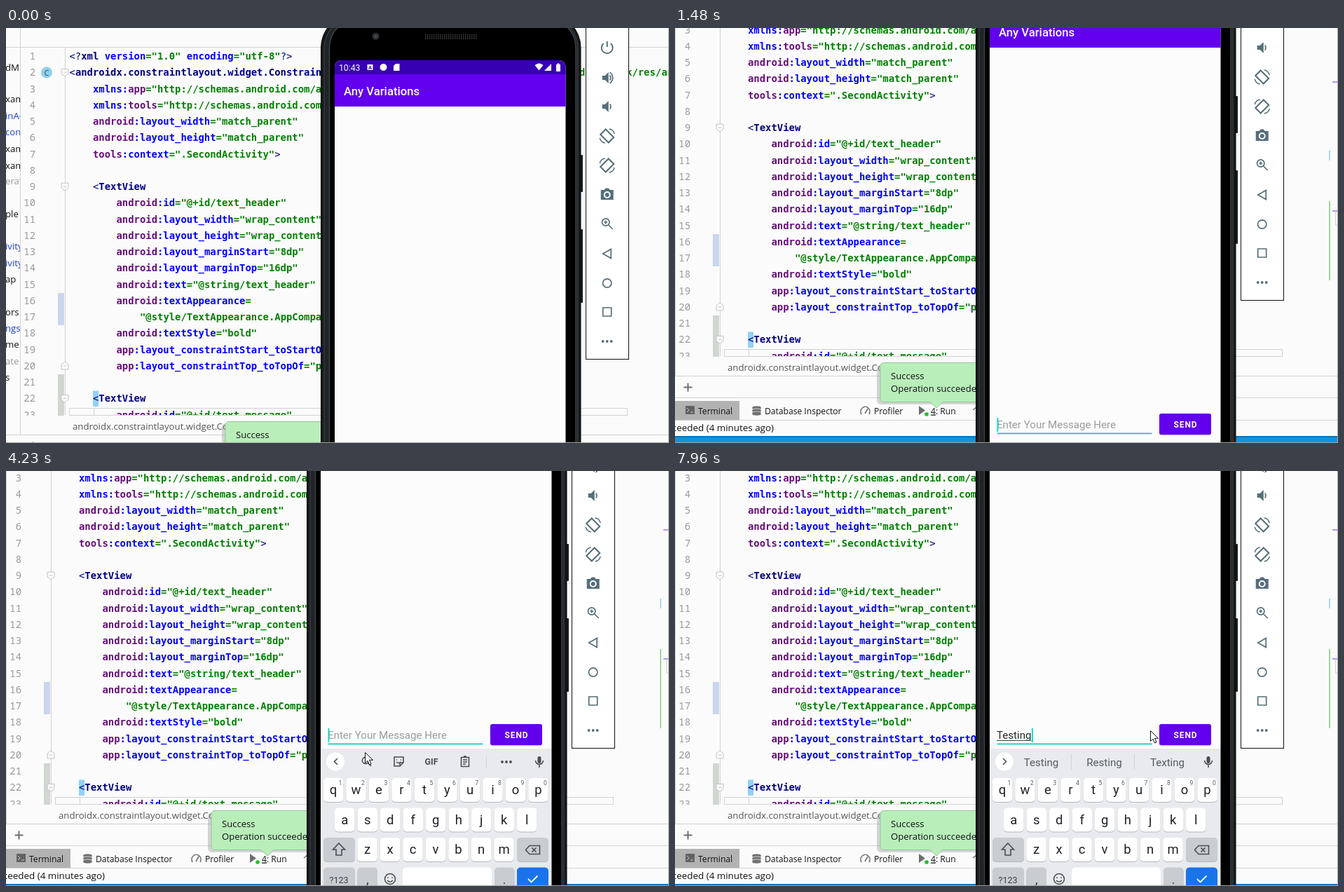
These frames come from a looping animation (946x592 px, 8 s). An HTML page:

```html
<!DOCTYPE html>
<html lang="en">
<head>
<meta charset="utf-8">
<style>
html, body { margin: 0; width: 100%; height: 100%; overflow: hidden; background: #fbfbfb; }
svg { display: block; width: 946px; height: 592px; font-family: "Open Sans", sans-serif; }
.code { font: bold 13.9px "DejaVu Sans Mono", monospace; }
.num { font: 13.95px "Noto Sans Mono", monospace; fill: #999; text-anchor: end; }
.val { fill: #008000; }
.mark { fill: #000080; font-weight: 400; }
.tag { fill: #000080; }
.ns { fill: #660e7a; }
.attr { fill: #00f; }
.ui { font-family: Roboto, sans-serif; }
.mid { text-anchor: middle; }
.line { fill: none; stroke: #d2d2d2; }
.icon { fill: none; stroke: #546e7a; stroke-width: 1.7; }
.full { fill: #546e7a; stroke: none; }
.kicon { fill: none; stroke: #4a4e53; stroke-width: 1.6; }
.kfull { fill: #4a4e53; stroke: none; }
</style>
</head>
<body>
<svg id="stage" viewBox="0 0 946 592"></svg>
<script>
const LOOP = 8000;
const rect = (x, y, w, h, fill, extra = '') =>
  `<rect x="${x}" y="${y}" width="${w}" height="${h}" fill="${fill}" ${extra}/>`;
const text = (x, y, size, fill, str, extra = '') =>
  `<text x="${x}" y="${y}" font-size="${size}" fill="${fill}" ${extra}>${str}</text>`;
const path = (d, cls, extra = '') => `<path d="${d}" class="${cls}" ${extra}/>`;
const circle = (x, y, r, extra) => `<circle cx="${x}" cy="${y}" r="${r}" ${extra}/>`;
const group = (x, y, body, extra = '') => `<g transform="translate(${x} ${y})" ${extra}>${body}</g>`;
const dots = (x, y, cls) => [-6, 0, 6].map(d => circle(x + d, y, 1.9, `class="${cls}"`)).join('');

// ---- code editor ----
const CHAR = 8.37, PITCH = 23.26, CODE_X = 70.5;
const lineY = n => -32 + (n - 1) * PITCH;
const source = `<?xml version="1.0" encoding="utf-8"?>
<androidx.constraintlayout.widget.ConstraintLayout xmlns:android="http://schemas.android.com/apk/res/android"
    xmlns:app="http://schemas.android.com/apk/res-auto"
    xmlns:tools="http://schemas.android.com/tools"
    android:layout_width="match_parent"
    android:layout_height="match_parent"
    tools:context=".SecondActivity">

    <TextView
        android:id="@+id/text_header"
        android:layout_width="wrap_content"
        android:layout_height="wrap_content"
        android:layout_marginStart="8dp"
        android:layout_marginTop="16dp"
        android:text="@string/text_header"
        android:textAppearance=
            "@style/TextAppearance.AppCompat"
        android:textStyle="bold"
        app:layout_constraintStart_toStartOf="parent"
        app:layout_constraintTop_toTopOf="parent" />

    <TextView
        android:id="@+id/text_message"`.split('\n');

const token = /(?<val>="[^"]*"|"[^"]*"|=)|(?<mark>[<?>\/]+)|(?<tag>(?<=[<?])[\w.]+)|(?<ns>(?:android|tools|app)(?=:)|(?<=xmlns:)\w+)|(?<attr>xmlns:|:?\w+)/g;
const highlight = line => line.trim().replace(token, (...args) => {
  const [kind, str] = Object.entries(args.at(-1)).find(([, v]) => v);
  return `<tspan class="${kind}">${str.replace(/</g, '&lt;').replace(/>/g, '&gt;')}</tspan>`;
});

function foldMark(n, up) {
  const y = lineY(n) - 5;
  const d = up ? 'M-5 5V-2L0-6 5-2V5Z' : 'M-5-5V2L0 6 5 2V-5Z';
  return group(64, y, path(d + 'M-2.5 0h5', 'line', 'style="fill:#fbfbfb;stroke:#c4c4c4"'));
}

function editor() {
  const project = [
    ['dM', 56], ['xamp', 101], ['inAc', 125, 1], ['cond', 148, 1], ['xamp', 172], ['xamp', 196],
    ['erate', 218, 2], ['ple', 265], ['ivity', 311, 1], ['ivity', 335, 1], ['ap', 358],
    ['ors.', 405], ['ngs', 428, 1], ['me', 451], ['ate', 475, 2], ['s', 498]];
  const inks = ['#111', '#1a3fc4', '#999'];
  return rect(-30, -100, 1100, 800, '#fbfbfb')
    + project.map(([s, y, ink = 0]) => text(-21, y - 72.5, 13.2, inks[ink], s)).join('')
    + rect(0, -100, 1000, 604, '#fbfbfb')
    + path('M-30-49.5H1000M.5-100V503', 'line')
    + rect(54, 301, 9, 46, '#c9d6ee') + rect(54, 417, 9, 59, '#d0d6d0')
    + path('M64.5-49V475', 'line')
    + rect(104, 440.5, 8, 22.5, '#90d2f8')
    + path('M105.5 466v10', 'line')
    + source.map((line, i) => {
        const x = CODE_X + line.search(/\S|$/) * CHAR, y = lineY(i + 1);
        return `<text class="num" x="22" y="${y}">${i + 1}</text><text class="code" x="${x}" y="${y}">${highlight(line)}</text>`;
      }).join('')
    + foldMark(2) + foldMark(9) + foldMark(20, true) + foldMark(22)
    + circle(38, -13.5, 8, 'fill="#8fd0ee"') + text(38, -9.5, 11, '#2c4a5a', 'C', 'class="mid"')
    + rect(70.5, 465.5, 796, 10, 'none', 'class="line"')
    + rect(1, 476, 1000, 113, '#fbfbfb')
    + rect(933, 182, 2, 14, '#a5daf2') + rect(933, 254, 2, 113, '#9cd99c')
    + rect(938, 83, 10, 2, '#b39be6') + rect(938, 267, 10, 2, '#b39be6')
    + path('M950 269H942.5V288H950', 'line');
}

// ---- bars below the editor ----
function bottomBars() {
  const grey = 'fill="none" stroke="#6e6e6e" stroke-width="1.6"';
  return text(75, 496, 13.2, '#555', 'androidx.constraintlayout.widget.ConstraintLayout')
    + path('M-30 503.5H1000M-30 534.5H1000M-30 566.5H1000', 'line')
    + '<path d="M12.5 519.5h12M18.5 513.5v12" stroke="#6e6e6e" stroke-width="2"/>'
    + rect(-1, 539, 93, 27, '#b2b2b2')
    + rect(15, 546, 13, 12, '#626262') + '<path d="M17 549l3 3-3 3M22 555h4" fill="none" stroke="#c8c8c8"/>'
    + text(33, 557.5, 12.1, '#111', 'Terminal')
    + [0, 4, 8].map(d => `<path d="M110 ${548 + d}a6.5 2 0 0 1 13 0v2a6.5 2 0 0 1-13 0z" fill="#707070" stroke="#fbfbfb" stroke-width=".7"/>`).join('')
    + text(128, 557.5, 12.1, '#111', 'Database Inspector')
    + `<path d="M266 558a6.5 7 0 1 1 11 0M271 557l4-7" ${grey}/>`
    + text(284, 557.5, 12.1, '#111', 'Profiler')
    + '<path d="M348 546l9 6.5-9 6.5z" fill="#6e6e6e"/>' + circle(359, 558, 2.8, 'fill="#1fc02c"')
    + text(365, 557.5, 12.1, '#111', '<tspan text-decoration="underline">4</tspan>: Run')
    + `<path d="M425 552l5-4 5 4" ${grey}/>`
    + text(141, 581.5, 13.4, '#111', 'succeeded (4 minutes ago)', 'text-anchor="end"')
    + rect(-30, 589, 1100, 80, '#0b96de') + rect(-30, 589, 1100, 2, '#0872b8')
    + rect(288, 487, 160, 57, '#8a8a8a', 'rx="6" opacity=".35"')
    + '<path d="M298 484.5H500V540.5H382L373 549 364 540.5H298a5 5 0 0 1-5-5V489.5a5 5 0 0 1 5-5z" fill="#b9eebb" stroke="#98c29a"/>'
    + text(308, 507.5, 13.1, '#111', 'Success') + text(308, 525.5, 13.1, '#111', 'Operation succeeded');
}

// ---- emulator side toolbar ----
function emulatorBar() {
  const speaker = 'M-7-3h4l5-5v16l-5-5h-4z';
  const turn = path('M-9.5-2L-2-9.5 9.5 2 2 9.5Z', 'icon', 'style="stroke-width:2"')
    + path('M3-10q6 1 7.5 7M-3 10q-6-1-7.5-7', 'icon', 'style="stroke-width:1.4"');
  const icons = [
    [-49, path('M-5-6a8 8 0 1 0 10 0M0-9v8', 'icon', 'style="stroke-width:2"')],
    [-6, path(speaker, 'full') + path('M4-3.5q2 3.5 0 7M4-8q8 8 0 16', 'icon')],
    [35, path(speaker, 'full') + path('M4-3.5q2.5 3.5 0 7', 'icon')],
    [77, turn],
    [119, `<g transform="scale(-1 1)">${turn}</g>`],
    [160, path('M-9-6h5l2-2.5h4l2 2.5h5v14h-18z', 'full') + circle(0, 1, 4, 'fill="#546e7a" stroke="#fff" stroke-width="2"')],
    [202, circle(-2, -2, 5.2, 'class="icon"') + path('M2 2l6 6M-4.5-2h5M-2-4.5v5', 'icon')],
    [245, path('M5.5-6.5v13L-6 0z', 'icon')],
    [287, circle(0, 0, 6.2, 'class="icon"')],
    [328, path('M-6-6h12v12h-12z', 'icon')],
    [370, dots(0, 0, 'full')]];
  return rect(807.5, -110, 61, 505.5, '#fff', 'stroke="#111"')
    + icons.map(([y, body]) => group(837.7, y, body)).join('');
}

// ---- on-screen keyboard ----
const GREY_KEY = '#c9ccd1';
const key = (x, y, w, fill = '#fff') =>
  rect(x, y + 1, w, 34, '#b4b7bb', 'rx="5"') + rect(x, y, w, 34, fill, 'rx="5"');

function letterRow(letters, firstX, y, digits) {
  return [...letters].map((ch, i) => {
    const x = firstX + i * 32.5;
    return key(x - 14.2, y, 28.4) + text(x, y + 23, 18.5, '#202124', ch, 'class="mid"')
      + (digits ? text(x + 10, y + 9.5, 8.5, '#55585c', (i + 1) % 10, 'class="mid"') : '');
  }).join('');
}

function keyboard() {
  const tools = circle(513, 413, 4.6, 'class="kicon"') + path('M516 416l5 5', 'kicon')
    + path('M554 408h13v8l-5 5h-8zM567 416h-5v5M557 412h1M563 412h1M557 415q3 3 6 0', 'kicon')
    + text(607, 419, 12.5, '#4a4e53', 'GIF', 'class="mid" font-weight="700"')
    + path('M649.5 408.5h11v13h-11zM652 412h6M652 415h6M652 418h4M653 407h4', 'kicon')
    + path('M685.5 406v18', 'line') + dots(714, 415, 'kfull') + path('M473 410l-4.5 4.5 4.5 4.5', 'kicon');
  const words = ['Testing', 'Resting', 'Texting']
    .map((w, i) => text(522.5 + i * 90, 420.5, 15.1, '#55595e', w, 'class="mid"')).join('')
    + path('M565.5 404v22M655.5 404v22', 'line') + path('M468 410l4.5 4.5-4.5 4.5', 'kicon');
  return rect(449, 396, 330, 300, '#e8eaed')
    + circle(470, 414.5, 13, 'fill="#fff"')
    + `<g id="tools">${tools}</g><g id="words">${words}</g>`
    + rect(758.5, 407, 5, 10, '#4a4e53', 'rx="2.5"') + path('M755.5 413a5.5 5.5 0 0 0 11 0M761 419v4', 'kicon')
    + letterRow('qwertyuiop', 467, 438, true)
    + letterRow('asdfghjkl', 483.3, 480.5)
    + key(453, 523, 45, GREY_KEY) + path('M475 531l8.5 9h-4.5v8h-8v-8h-4.5z', 'kicon')
    + letterRow('zxcvbnm', 515.5, 523)
    + key(729, 523, 45, GREY_KEY) + path('M747 534.5h14.5v12h-14.5l-5.5-6zM750.5 537.5l6 6M756.5 537.5l-6 6', 'kicon')
    + key(453, 565.5, 45, GREY_KEY) + text(475, 587.5, 12.5, '#3c4043', '?123', 'class="mid"')
    + key(501.5, 565.5, 28.5, GREY_KEY) + text(516, 589, 17, '#202124', ',', 'class="mid"')
    + circle(548, 582, 7.5, 'class="kicon"') + path('M545 579.5v1.5M551 579.5v1.5M544 584q4 4 8 0', 'kicon')
    + key(566, 565.5, 127)
    + key(697, 565.5, 28.5, GREY_KEY) + text(711, 589, 17, '#202124', '.', 'class="mid"')
    + key(729, 565.5, 45, '#1a73e8') + '<path d="M745 582l4.5 4.5 9-9" fill="none" stroke="#fff" stroke-width="1.8"/>'
    + rect(449, 396, 330, 300, '#000', 'id="dim"');
}

// ---- phone ----
function phone() {
  const status = rect(449, -31, 330, 21, '#3700b3')
    + text(455, -16.5, 12.2, '#fff', '10:43')
    + rect(495.5, -25, 8, 8, '#fff') + text(499.5, -18, 7.5, '#3700b3', 'A', 'class="mid" font-weight="700"')
    + circle(518.5, -21, 5, 'fill="#fff"')
    + '<path d="M533-23l3-3h5.5v10h-8.5zM734.5-24q6-5 12 0l-6 7.5zM758-26v10h-10zM765-25h1.5v-1.5h3v1.5h1.5v10h-6z" fill="#fff"/>';
  const form = rect(459.5, 584.5, 221, 1.8, '#14cdbd')
    + text(459, 578, 15.1, '#9b9b9b', 'Enter Your Message Here', 'id="hint"')
    + text(459, 578, 15.1, '#252525', '', 'id="typed"')
    + rect(459, 580, 0, 1, '#444', 'id="underline"') + rect(459.5, 563, 1.8, 20, '#03dac5', 'id="caret"')
    + rect(691, 558, 74, 30.5, '#aaa', 'rx="3" opacity=".6"') + rect(691, 557, 74, 30, '#6200ee', 'rx="3"')
    + text(728.5, 576.5, 12, '#fff', 'SEND', 'class="mid" font-weight="700" letter-spacing=".9"');
  return rect(800, 104, 3, 53, '#1c1c1e', 'rx="1"') + rect(800, 210, 3, 105, '#1c1c1e', 'rx="1"')
    + rect(429.5, -97, 370.5, 900, '#17191b', 'rx="48" stroke="#060606"')
    + rect(434, -93, 362, 900, '#202426', 'rx="45" stroke="#33383c" stroke-width="1.5"')
    + rect(441.5, -90, 351.5, 900, '#000', 'rx="41" stroke="#3a4046" stroke-width="1.5"')
    + circle(507.5, -65, 5, 'fill="#2c2e30"') + circle(507.5, -65, 2, 'fill="#4b5258"')
    + [-67, -64.5, -62].map(y => `<path d="M578 ${y}H653" stroke="#4a4a4a" stroke-width="1.4" stroke-dasharray="1.5 1.5"/>`).join('')
    + '<clipPath id="glass"><rect x="449" y="-31" width="329.5" height="800" rx="9"/></clipPath>'
    + `<g clip-path="url(#glass)" class="ui">${rect(449, -31, 330, 700, '#fcfcfc', 'id="window"')}`
    + `<g id="app">${status}${rect(449, -11, 330, 46, '#6200ee')}`
    + text(462, 19, 16.7, '#fff', 'Any Variations', 'font-weight="500"') + form
    + `</g><g id="keys">${keyboard()}</g></g>`;
}

document.getElementById('stage').innerHTML =
  `<g id="world">${editor()}${bottomBars()}${phone()}${emulatorBar()}</g>`
  + '<path id="mouse" d="M.5 .5V15.5L4 12.3 6.5 18 9 17 6.5 11.3H11.5Z" fill="#fff" stroke="#111"/>'
  + rect(945, 0, 1, 592, '#a5a5a5') + rect(0, 591, 946, 1, '#a5a5a5');

// ---- timeline: [time, ...state], held until the next entry ----
const pan = [[0, 20, 77], [130, 18, 72], [260, 15, 62], [390, 11, 47], [510, 7, 27], [660, 4, 6],
  [800, 1, -14], [1480, 0, -7], [1630, 0, 3], [2060, 0, 1], [2210, 0, 0]];
const pointer = [[0, -50, -50], [2500, 775, -3], [2640, 735, 120], [2790, 640, 330], [2930, 545, 510],
  [3070, 506, 569], [4010, 508, 480], [4230, 512, 401], [4660, 519, 384],
  [7570, 550, 382], [7820, 625, 376], [7960, 678, 370]];
// app shift, window bottom, keyboard offset, keyboard dimming
const slide = [[0, 0, 700, 250, 1], [3490, 20, 580, 200, .8], [3600, 79, 527, 141, .64],
  [3720, 150, 452, 56, .32], [3870, 187, 408, 12, .1], [4010, 196, 396, 0, 0]];
const blink = [[0, 0], [1080, 1], [1630, 0], [2060, 1], [2500, 0], [3070, 1], [3600, 0],
  [4230, 1], [4510, 0], [4940, 1], [5510, 0], [5910, 1]];
const typing = [[0, 0], [5910, 1], [6560, 2], [6710, 3], [7140, 4], [7290, 6], [7430, 7]];
const SUGGEST_AT = 7430;

const at = (track, t) => track.findLast(step => step[0] <= t).slice(1);
const $ = id => document.getElementById(id);
const move = (id, x, y) => $(id).setAttribute('transform', `translate(${x} ${y})`);
const show = (id, on) => $(id).setAttribute('visibility', on ? 'visible' : 'hidden');

function render() {
  const t = performance.now() % LOOP;
  const [shift, bottom, drop, dim] = at(slide, t);
  const [typed] = at(typing, t);
  move('world', ...at(pan, t));
  move('mouse', ...at(pointer, t));
  move('app', 0, -shift);
  move('keys', 0, drop);
  $('window').setAttribute('height', bottom + 31);
  $('dim').setAttribute('opacity', dim);
  $('typed').textContent = 'Testing'.slice(0, typed);
  const width = typed ? $('typed').getComputedTextLength() : 0;
  $('underline').setAttribute('width', width);
  $('caret').setAttribute('x', 459.5 + width);
  show('caret', at(blink, t)[0]);
  show('hint', !typed);
  show('tools', t < SUGGEST_AT);
  show('words', t >= SUGGEST_AT);
  requestAnimationFrame(render);
}
render();
</script>
</body>
</html>
```
